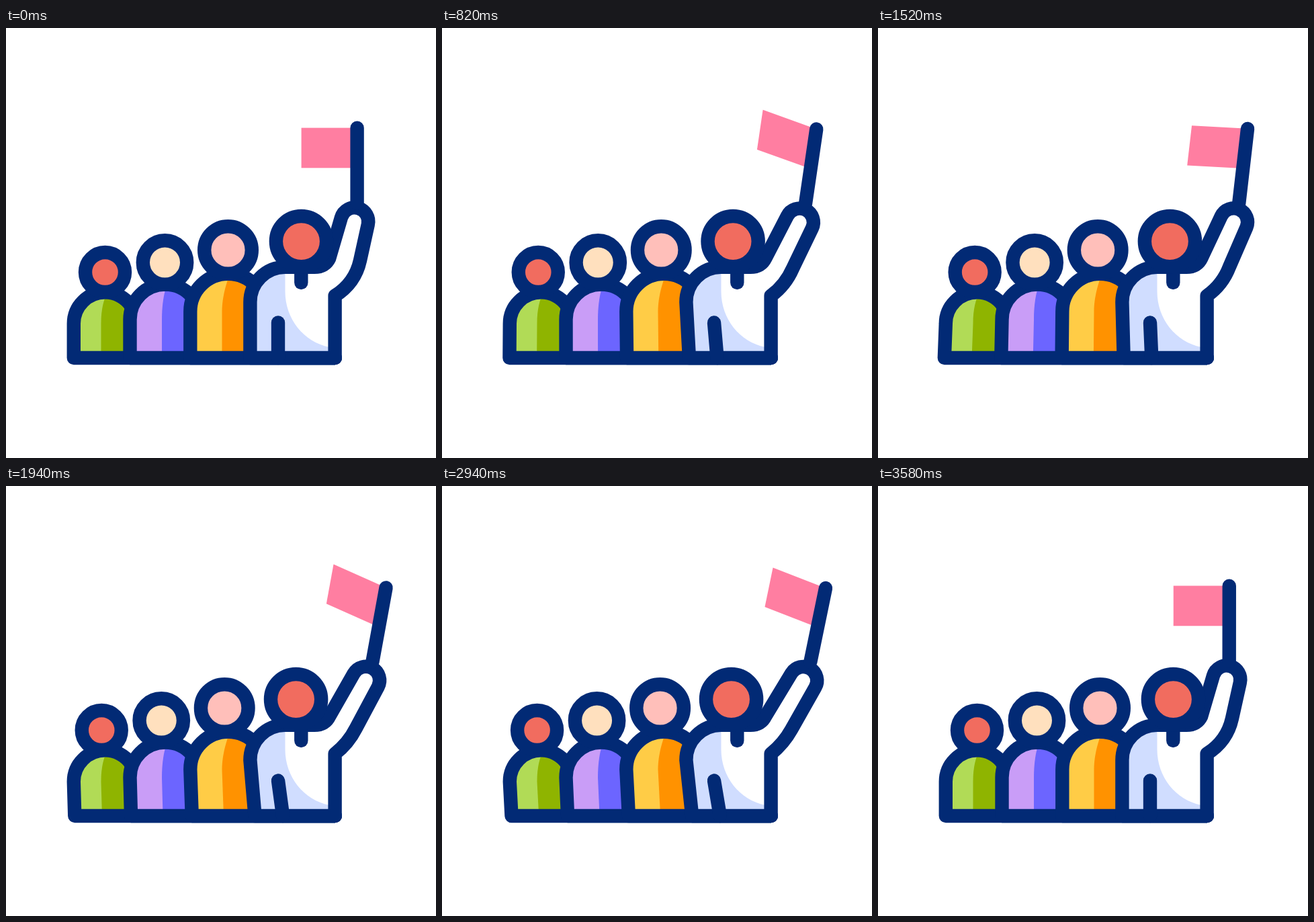
Write an HTML page with a canvas that moves like this. It is 640 by 640 pixels and loops after 3.6 s.

```html
<!DOCTYPE html>
<html lang="en">
<head>
<meta charset="utf-8">
<title>Group with guide</title>
<style>
html, body { margin: 0; width: 100%; height: 100%; overflow: hidden; background: #fff; }
canvas { display: block; width: 640px; height: 640px; }
</style>
</head>
<body>
<canvas id="stage" width="640" height="640"></canvas>
<script>
const ctx = document.getElementById('stage').getContext('2d');
const LOOP = 3600, STEP = 20, HALF = 600;
const NAVY = '#022a75', FLOOR = 491, LINE = 20.4;
const RAD = Math.PI / 180;

const followers = [
  { x: 147.5, y: 440, r: 46.7, end: -0.6, split: 141.5, light: '#b1db56', dark: '#8fb400',
    lean: [3, -8], head: [147.5, 363.5, 29.5], skin: '#f16c5f' },
  { x: 237, y: 434, r: 52.5, end: -0.7, split: 232, light: '#c99df7', dark: '#6c65ff',
    lean: [2.8, -6.2], head: [236.5, 349, 32.7], skin: '#ffe0be' },
  { x: 330.5, y: 422, r: 56.2, end: -0.75, split: 321.5, light: '#ffcc46', dark: '#ff9200',
    lean: [3.9, -6.3], head: [330.5, 330.5, 35.3], skin: '#ffbfba' }
];

const mix = (a, b, k) => a + (b - a) * k;
const smooth = s => s * s * (3 - 2 * s);

// Eased swing from rest to high and low in turn, back to rest at the loop's end.
function swing(t, high, low, delay = 0) {
  const keys = [[0, 0]];
  for (let i = 1; i < 6; i++) keys.push([i * HALF + delay, i % 2 ? high : low]);
  keys.push([LOOP, 0]);
  const i = keys.findIndex(k => k[0] > t);
  const [t0, v0] = keys[i - 1], [t1, v1] = keys[i];
  return mix(v0, v1, smooth((t - t0) / (t1 - t0)));
}

function stroke(path, width = LINE) {
  ctx.strokeStyle = NAVY;
  ctx.lineWidth = width;
  ctx.stroke(path);
}

function fill(path, color) {
  ctx.fillStyle = color;
  ctx.fill(path);
}

function line(x1, y1, x2, y2) {
  const path = new Path2D();
  path.moveTo(x1, y1);
  path.lineTo(x2, y2);
  stroke(path);
}

function clipped(shape, draw) {
  ctx.save();
  ctx.clip(shape);
  draw();
  ctx.restore();
}

function drawHead([x, y, r], shift, skin) {
  const path = new Path2D();
  path.arc(x + shift, y, r, 0, 7);
  fill(path, skin);
  stroke(path);
}

function drawFollower(f, t, p) {
  const d = swing(t, ...f.lean), left = f.x - f.r, right = f.x + f.r;

  const body = new Path2D();
  body.moveTo(left + d, FLOOR);
  body.lineTo(left, f.y);
  body.arc(f.x, f.y, f.r, Math.PI, 2 * Math.PI);
  body.lineTo(right + 12, FLOOR);
  body.closePath();
  fill(body, f.light);

  const shade = new Path2D();
  shade.moveTo(f.x + 3, f.y - f.r);
  shade.bezierCurveTo(f.x - 2, f.y - f.r + 12, f.split, f.y - 22, f.split, f.y);
  shade.lineTo(f.split + d, FLOOR);
  shade.lineTo(right + 40, FLOOR);
  shade.lineTo(right + 40, f.y - f.r);
  clipped(body, () => fill(shade, f.dark));

  const outline = new Path2D();
  outline.moveTo(489.8, FLOOR);
  outline.lineTo(left + d, FLOOR);
  outline.lineTo(left, f.y);
  outline.arc(f.x, f.y, f.r, Math.PI, 2 * Math.PI + f.end);
  stroke(outline);
  drawHead(f.head, -6.1 * p, f.skin);
}

function drawFlag(t, p) {
  const skew = swing(t, -14, 11, 100);
  ctx.save();
  ctx.translate(522.6 + 20.8 * p, 288 + 0.5 * p);
  ctx.rotate(12 * RAD * p);
  ctx.save();
  ctx.transform(1, -Math.tan(skew * RAD), 0, 1, 0, 0);
  ctx.fillStyle = '#ff7ea1';
  ctx.fillRect(-83, -139.4, 83, 59.7);
  ctx.restore();
  line(0, -139.3, 0, -27);
  ctx.restore();
}

function drawGuide(t, p) {
  const d = swing(t, 9.3, -6.3);
  const m = (a, b) => mix(a, b, p);
  const inner = m(16.5, 31.8) * RAD, outer = m(13, 30.3) * RAD;

  const body = new Path2D();
  body.moveTo(363.4 + d, FLOOR);
  body.lineTo(363.4, 408);
  body.arc(415.5, 408, 52.1, Math.PI, 1.5 * Math.PI);
  body.lineTo(459, 355.9);
  body.bezierCurveTo(470, 355.9, 477.5, 351, 481.2, 343);
  body.arc(m(518.7, 538.2), m(288, 289.6), 20.6, Math.PI + inner, 2 * Math.PI + outer);
  body.lineTo(m(527, 519.8), m(346, 363));
  body.bezierCurveTo(m(523, 512.7), m(364, 375.4), m(513, 503.7), m(384, 387), 489.6, 398.5);
  body.lineTo(489.6, FLOOR);
  body.closePath();
  fill(body, '#fff');

  const shade = new Path2D();
  shade.moveTo(415.5, 350);
  shade.lineTo(415.5, 392);
  shade.bezierCurveTo(415.5, 433, 443, 467, 481, 475);
  shade.lineTo(481, FLOOR);
  shade.lineTo(340, FLOOR);
  shade.lineTo(340, 350);
  clipped(body, () => fill(shade, '#d0ddff'));

  stroke(body);
  line(439.3, 356, 439.3, 379);
  line(405, 438.5, 405 + d, FLOOR);
  drawHead([439.5, 317.6, 37.6], -9.2 * p, '#f16c5f');
}

function render(now) {
  const t = Math.floor((now % LOOP) / STEP) * STEP;
  const p = swing(t, 1, 0);
  ctx.fillStyle = '#fff';
  ctx.fillRect(0, 0, 640, 640);
  ctx.lineCap = ctx.lineJoin = 'round';
  followers.forEach(f => drawFollower(f, t, p));
  drawGuide(t, p);
  drawFlag(t, p);
}

let start;
function frame(now) {
  start ??= now;
  render(Math.max(0, now - start));
  requestAnimationFrame(frame);
}
requestAnimationFrame(frame);
</script>
</body>
</html>
```
